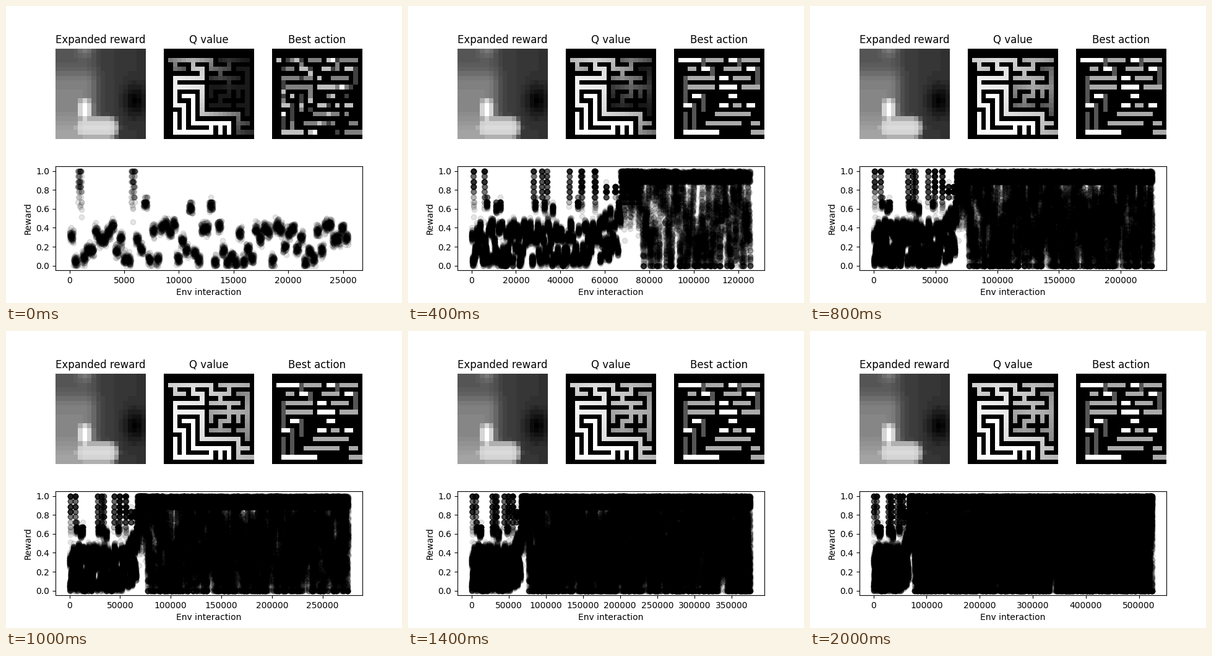
Write a matplotlib script that moves like this. It is 640 px wide and 480 px high and loops after 2100 ms.

```python
import numpy as np
import matplotlib.pyplot as plt
from matplotlib.animation import FuncAnimation

FRAMES, INTERVAL = 21, 100
STRIDE, BIN = 5, 375           # env steps per sample, per plateau
FIRST, PER_FRAME = 25500, 25000
SOLVED, ROAMING = 67000, 76000
SIZE = 20

# Move that leads each maze cell towards the goal G
MOVES = ["RRDLLRDLL", "ULRDULLRD", "DLLLRULLD",
         "DLLLRRULL", "DRDUURUUU", "RDDURULRU",
         "DDGULLLLU", "DDULLLLUL", "RRRRUUUUL"]
STEP = {"U": (-1, 0), "D": (1, 0), "L": (0, -1), "R": (0, 1), "G": (0, 0)}
ACTION = {move: i for i, move in enumerate("UDLR")} | {"G": 0}


def steps_to_goal(r, c):
    move = MOVES[r][c]
    if move == "G":
        return 0
    dr, dc = STEP[move]
    return 2 + steps_to_goal(r + dr, c + dc)


def build_maze():
    """Distance to the goal and best action for every open pixel."""
    dist = np.full((SIZE, SIZE), np.nan)
    best = np.zeros((SIZE, SIZE))

    def carve(y, x, d, move):
        dist[y, x], best[y, x] = d, ACTION[move]

    for r, row in enumerate(MOVES):
        for c, move in enumerate(row):
            y, x, d = 2 + 2 * r, 2 + 2 * c, steps_to_goal(r, c)
            dr, dc = STEP[move]
            carve(y + dr, x + dc, max(d - 1, 0), move)
            carve(y, x, d, move)
    carve(2, 1, dist[2, 2] + 1, "R")
    carve(18, 19, dist[18, 18] + 1, "L")
    return dist, best


DIST, BEST = build_maze()
OPEN = ~np.isnan(DIST)


def q_values(k):
    """Value spreads outwards from the goal as learning goes on."""
    reach = np.interp(k, [0, 2, 4, 8, 12], [47, 33, 55, 66, 90])
    width = np.interp(k, [0, 2, 4], [5, 10, 5])
    d = np.where(OPEN, DIST, 0)
    q = (1 - (d / 88) ** 2.5) / (1 + np.exp((d - reach) / width))
    q = np.maximum(q, 0.1)
    return np.where(OPEN, q / q.max(), 0)


def actions(k):
    """Greedy actions, still partly undecided at the start."""
    rng = np.random.default_rng(5 + k)
    noise = max(0, 0.38 - 0.25 * k)
    guess = rng.choice(5, (SIZE, SIZE), p=[.3, .25, .25, .14, .06])
    act = np.where(rng.random((SIZE, SIZE)) < noise, guess, BEST)
    return np.where(OPEN, act, 0)


def ramp(v, mid, width):
    return 1 / (1 + np.exp((mid - v) / width))


def reward_map():
    y, x = np.mgrid[:SIZE, :SIZE]
    left = 85 + 45 * ramp(y, 5, 0.8) + 35 * ramp(y, 15.5, 1)
    right = 62 - 1.1 * (x - 8)
    field = left + (right - left) * ramp(x, 8.3, 0.7)
    field += 38 * np.exp(-((x - 6) / 1.5) ** 2 - (y / 1.2) ** 2)
    field -= 50 * np.exp(-((x - 17) / 2.5) ** 2 - ((y - 11) / 3.5) ** 2)
    # L-shaped glow around the goal
    arm_up = np.hypot(x - 6, y - np.clip(y, 12, 14))
    arm_side = np.hypot(x - np.clip(x, 6, 11), y - 17)
    glow = np.maximum(255 * np.exp(-(arm_up / 2.2) ** 2),
                      215 * np.exp(-(arm_side / 2.9) ** 4))
    return np.round(np.clip(np.maximum(field, glow), 0, 255) / 6)


SPIKES = [800, 5800, 28000, 31700, 34000, 44000, 49500, 55500]
LEVELS = [0.06, 0.17, 0.29, 0.36, 0.42, 0.63]
WEIGHTS = [0.27, 0.14, 0.17, 0.15, 0.19, 0.08]


def plateau(x, rng):
    """Mean and spread of the reward in the plateau around x."""
    if any(abs(x - s) <= BIN / 2 for s in SPIKES):
        return 0.86, 0.13
    if x > ROAMING:
        return rng.uniform(0, 0.95), 0.13
    if x > SOLVED:
        return rng.uniform(0.6, 1), 0.12
    lift = 0.2 * (x > 57000) * rng.random()
    return rng.choice(LEVELS, p=WEIGHTS) + lift + rng.normal(0, 0.02), 0.03


def reward_history():
    rng = np.random.default_rng(11)
    x = np.arange(0, FIRST + PER_FRAME * (FRAMES - 1), STRIDE)
    centres = np.arange(0, x[-1] + BIN, BIN) + BIN / 2
    mean, spread = np.array([plateau(c, rng) for c in centres])[x // BIN].T
    y = mean + spread * rng.normal(size=x.size)
    stepped = 1 - np.round((1 - y) / 0.055) * 0.055
    y = np.where((y > 0.65) & (x < ROAMING), stepped, y)
    at_goal = (x > SOLVED) & (rng.random(x.size) < 0.3)
    y = np.where(at_goal, 1 - 0.12 * rng.random(x.size), y)
    return x, np.clip(y, 0, 1)


X, Y = reward_history()

fig = plt.figure(figsize=(6.4, 4.8), dpi=100)


def image_panel(pos, title, data):
    ax = fig.add_subplot(2, 3, pos)
    ax.set_title(title)
    ax.axis("off")
    return ax.imshow(data, cmap="gray")


image_panel(1, "Expanded reward", reward_map())
q_img = image_panel(2, "Q value", q_values(0))
act_img = image_panel(3, "Best action", actions(0))

ax = fig.add_subplot(2, 1, 2)
ax.set_xlabel("Env interaction")
ax.set_ylabel("Reward")
ax.set_ylim(-0.05, 1.05)
dots, = ax.plot([], [], "o", color="black", alpha=0.1)


def update(k):
    end = FIRST + PER_FRAME * k
    n = end // STRIDE
    dots.set_data(X[:n], Y[:n])
    ax.set_xlim(-0.05 * end, 1.05 * end)
    act = actions(k)
    q_img.set_data(q_values(k))
    act_img.set_data(act)
    act_img.set_clim(0, act.max())
    return dots, q_img, act_img


anim = FuncAnimation(fig, update, frames=FRAMES, interval=INTERVAL,
                     repeat=True, repeat_delay=0)
plt.show()
```
